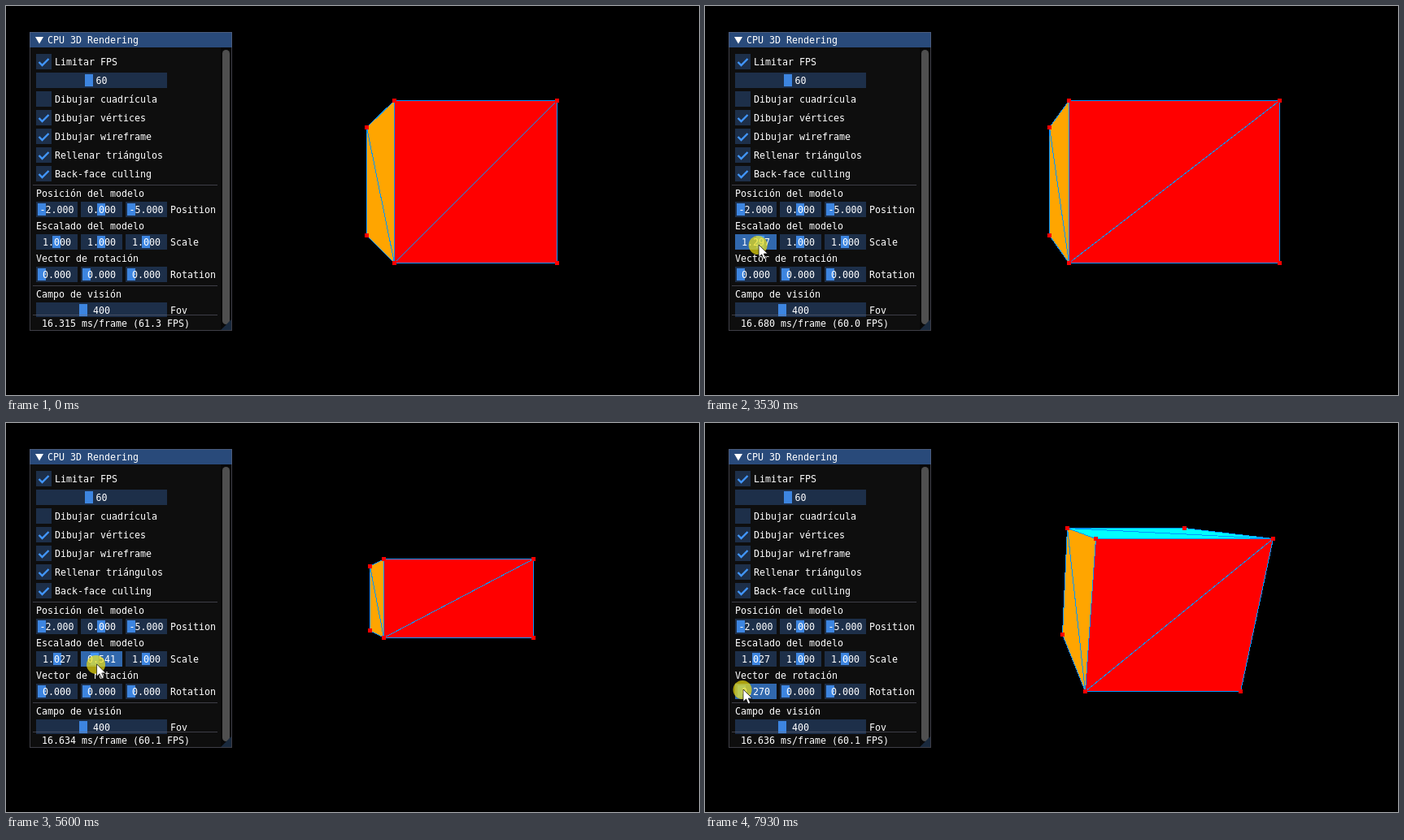
Write an HTML page that moves like this. It is 852x479 px and loops after 8 s.

```html
<!DOCTYPE html>
<html lang="es">
<head>
<meta charset="utf-8">
<title>CPU 3D Rendering</title>
<style>
html, body { margin: 0; width: 100%; height: 100%; overflow: hidden; background: #000; }
svg { display: block; width: 100%; height: 100%; }
text { font: 11.63px "DejaVu Sans Mono", "Liberation Mono", monospace; fill: #fff; white-space: pre; }
.wire { fill: none; stroke: #0096ff; stroke-width: 1; }
.mid { text-anchor: middle; }
</style>
</head>
<body>
<svg id="stage" viewBox="0 0 852 479"></svg>
<script>
const LOOP = 8000, TICK = 200 / 3, LAG = 30;
const IDLE = '#1d2f49', HOVER = '#24456d', ACTIVE = '#3168ad', GRAB = '#3d85e0', BLUE = '#4296fa';
const LINE = 'rgba(110,110,128,.5)';
const stage = document.getElementById('stage');

function set(el, attrs) {
  for (const k in attrs) el.setAttribute(k, attrs[k]);
  return el;
}
function add(tag, attrs, parent = stage) {
  return parent.appendChild(set(document.createElementNS('http://www.w3.org/2000/svg', tag), attrs));
}
const rect = (x, y, width, height, fill, parent) => add('rect', { x, y, width, height, fill }, parent);
const show = (el, on) => set(el, { display: on ? 'inline' : 'none' });
const clamp = (v, lo, hi) => Math.min(hi, Math.max(lo, v));

function label(x, cy, text) {
  const el = add('text', { x, y: cy + 4 });
  el.textContent = text;
  return el;
}

// Keys are [time, values...], joined by a cosine ease.
function track(keys, t) {
  const i = keys.findIndex(k => k[0] > t);
  if (i <= 0) return keys.at(i).slice(1);
  const a = keys[i - 1], b = keys[i];
  const u = (1 - Math.cos(Math.PI * (t - a[0]) / (b[0] - a[0]))) / 2;
  return a.slice(1).map((v, j) => v + (b[j + 1] - v) * u);
}

// The pointer drags the sliders, so every animated value comes from its path.
const POINTER = [
  [800, 105, 453], [1250, 19, 385], [1730, 63.5, 291],
  [1970, 63.5, 291], [2620, 66, 291], [2920, 82, 293], [3277, 82, 294], [3802, 49, 294], [4230, 64, 295],
  [4950, 118.5, 296], [5209, 100, 296], [6030, 125, 298], [6202, 79, 299], [6770, 125, 299],
  [6920, 125, 299], [7070, 120, 300],
  [7720, 46, 328], [7760, 46, 328], [7870, 47, 328]
];
const FRAME_MS = [[0, 16.315], [2400, 16.715], [3533, 16.68], [4667, 16.615], [5600, 16.634],
  [6667, 16.541], [7933, 16.636]];

function slider(x, cy, w, min, max, value, digits = 3, h = 19) {
  const y = cy - 10;
  const frame = rect(x, y, w, h, IDLE);
  const grab = rect(x, y + 2, 10, Math.min(15, h - 2), GRAB);
  const text = set(label(x + w / 2, cy, ''), { class: 'mid' });
  const update = (v, active, hover) => {
    set(frame, { fill: active ? ACTIVE : hover ? HOVER : IDLE });
    set(grab, {
      x: Math.floor(x + 2 + (v - min) / (max - min) * (w - 14)),
      fill: active ? BLUE : GRAB
    });
    text.textContent = v.toFixed(digits);
  };
  update(value);
  return { value, update, hit: (px, py) => px >= x && px < x + w && py >= y && py < y + h };
}

function vector(cy, title, name, min, max, values) {
  label(37, cy - 20, title);
  label(202, cy, name);
  return values.map((v, i) => slider(37 + 55 * i, cy, 51, min[i], max[i], v));
}

// Panel
rect(29, 32, 249, 368, '#0e0e0e');
rect(29, 32, 249, 19, '#294a7a');
add('path', { d: 'M36 38H46L41 46.5Z', fill: '#fff' });
label(51, 42, 'CPU 3D Rendering');
rect(264, 51, 13, 348, '#080808');
set(rect(266, 54, 9, 338, '#4f4f4f'), { rx: 4.5 });
add('path', { d: 'M264 399L277 386V399Z', fill: '#19293d' });
set(rect(29.5, 32.5, 248, 367, 'none'), { stroke: LINE });

['Limitar FPS', '', 'Dibujar cuadrícula', 'Dibujar vértices', 'Dibujar wireframe',
 'Rellenar triángulos', 'Back-face culling'].forEach((name, i) => {
  const cy = 69 + 23 * i;
  if (!name) return slider(37, cy, 161, 1, 150, 60, 0);
  rect(37, cy - 10, 19, 19, IDLE);
  if (i !== 2) add('path', { d: `M40.5 ${cy}l4 4l8 -8`, fill: 'none', stroke: BLUE, 'stroke-width': 2.4 });
  label(60, cy, name);
});

vector(251, 'Posición del modelo', 'Position', [-2, -2, -5], [2, 2, 5], [-2, 0, -5]);
const scales = vector(291, 'Escalado del modelo', 'Scale', [0, 0, 0], [2, 2, 2], [1, 1, 1]);
const turns = vector(331, 'Vector de rotación', 'Rotation', [0, 0, 0], [10, 10, 10], [0, 0, 0]);
label(37, 355, 'Campo de visión');
slider(37, 375, 161, 0, 1150, 400, 0, 18);
label(202, 375, 'Fov');
[220, 344, 380].forEach(y => rect(33, y, 227, 1, LINE));
const stats = label(44, 391, '');

// Each drag maps the 37 px of travel right of x0 to the slider's range.
const drags = [
  { slider: scales[0], press: 1900, release: 4230, x0: 45, range: 2 },
  { slider: scales[1], press: 4950, release: 7130, x0: 100, range: 2 },
  { slider: turns[0], press: 7760, release: LOOP, x0: 46, range: 10 }
];
function dragValue({ press, release, x0, range }, t) {
  const [x] = track(POINTER, clamp(t - LAG, press, release));
  return clamp(Math.round((x - x0) / 37 * range * 37 / range * range) / 37, 0, range);
}

// Cube: corner bits are 1 = right, 2 = bottom, 4 = far. The diagonal joins the first and third corners.
const scene = add('g', { 'shape-rendering': 'crispEdges' });
const faces = [
  { corners: [4, 5, 1, 0], fill: '#0ff' },
  { corners: [4, 0, 2, 6], fill: '#ffa500' },
  { corners: [2, 0, 1, 3], fill: '#f00' }
];
faces.forEach(f => f.body = add('path', { fill: f.fill }, scene));
faces.forEach(f => f.wire = add('path', { class: 'wire' }, scene));
const dots = Array.from({ length: 8 }, () => rect(0, 0, 5, 5, '#f00', scene));

const halo = add('circle', { r: 11.5, fill: '#f0e010', 'fill-opacity': .7 });
const arrow = add('path', {
  d: 'M0 0V15.2L3.6 11.9L6.1 17.8L8.7 16.7L6.2 11H11Z',
  fill: '#fff', stroke: '#000', 'stroke-width': .7
});

// Depth takes the vertical scale.
function project(i, sx, sy, rot) {
  const x = 2 + (i & 1 ? sx : -sx);
  const y = i & 2 ? sy : -sy, z = i & 4 ? sy : -sy;
  const c = Math.cos(rot), s = Math.sin(rot);
  const f = 400 / (5 + y * s + z * c);
  return [Math.floor(377 + x * f), Math.floor(216 + (y * c - z * s) * f)];
}

function drawCube(sx, sy, rot) {
  const pts = dots.map((_, i) => project(i, sx, sy, rot));
  const used = new Set();
  for (const f of faces) {
    const q = f.corners.map(i => pts[i]);
    const area = q.reduce((sum, [x, y], i) => {
      const [nx, ny] = q[(i + 1) % 4];
      return sum + x * ny - nx * y;
    }, 0);
    show(f.body, area >= 0);
    show(f.wire, area >= 0);
    if (area < 0) continue;
    f.corners.forEach(i => used.add(i));
    const p = q.map(([x, y]) => `${x + .5} ${y + .5}`);
    const d = `M${p.join('L')}Z`;
    set(f.body, { d });
    set(f.wire, { d: `${d}M${p[0]}L${p[2]}` });
  }
  dots.forEach((dot, i) => {
    show(dot, used.has(i));
    set(dot, { x: pts[i][0] - 2, y: pts[i][1] - 2 });
  });
}

function draw(ms) {
  const t = Math.floor((ms + 8) / TICK) * TICK % LOOP;
  const held = drags.find(d => t > d.press && t < d.release);
  const [px, py] = track(POINTER, t);
  const [hx, hy] = track(POINTER, t - TICK);

  const values = drags.map(d => dragValue(d, t));
  for (const s of [...scales, ...turns]) {
    const i = drags.findIndex(d => d.slider === s);
    s.update(i < 0 ? s.value : values[i], held?.slider === s, !held && s.hit(hx, hy));
  }
  drawCube(...values);

  const [frame] = track(FRAME_MS, t);
  stats.textContent = `${frame.toFixed(3)} ms/frame (${(1000 / frame).toFixed(1)} FPS)`;

  show(arrow, t >= POINTER[0][0]);
  set(arrow, { transform: `translate(${px} ${py})` });
  show(halo, held);
  set(halo, { cx: px - 1, cy: py + .5 });
}

const start = performance.now();
function loop() {
  draw((performance.now() - start) % LOOP);
  requestAnimationFrame(loop);
}
loop();
</script>
</body>
</html>
```
